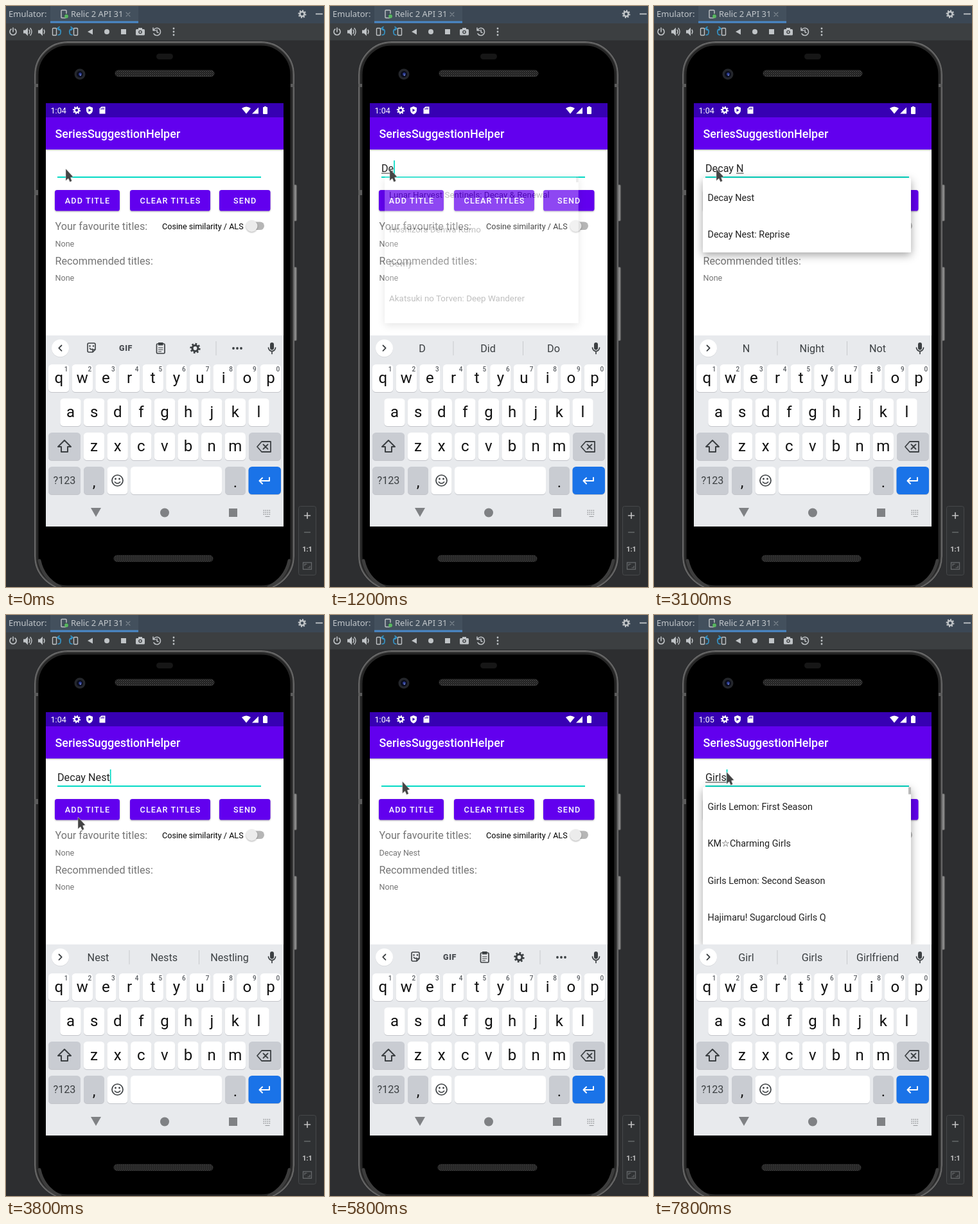
Write an HTML page that moves like this. It is 495 by 903 pixels and loops after 8 s.

```html
<!DOCTYPE html>
<html lang="en">
<head>
<meta charset="utf-8">
<title>Emulator demo</title>
<style>
html, body { margin: 0; width: 100%; height: 100%; overflow: hidden; background: #2d2e30; }
svg { display: block; width: 495px; height: 903px; font-family: Roboto, "Noto Sans", sans-serif; }
.ide { font: 13px "Noto Sans", "Open Sans", sans-serif; fill: #c3c8cc; }
.mid { text-anchor: middle; }
.btn { font-size: 12.6px; font-weight: 500; letter-spacing: 1.12px; fill: #fff; }
.head { font-size: 16.2px; fill: #757575; }
.small { font-size: 12.6px; fill: #757575; }
.row { font-size: 14.4px; fill: #212121; }
.key { font-size: 24px; fill: #111; }
.sup { font-size: 10px; fill: #5a5e63; font-weight: 500; }
.hint { font-size: 16.2px; fill: #3c4043; }
.raised { filter: drop-shadow(0 1.5px 1.2px rgba(0,0,0,.32)); }
.sheet { filter: drop-shadow(0 4px 7px rgba(0,0,0,.36)); }
.line { fill: none; stroke-linecap: round; stroke-linejoin: round; }
</style>
</head>
<body>
<svg id="stage" viewBox="0 0 495 903"></svg>
<script>
const LOOP = 8000, STEP = 100;
const INK = '#3c4043', PURPLE = '#6200ee', TEAL = '#03dac5';

const rect = (x, y, w, h, fill, r = 0, more = '') =>
  `<rect x="${x}" y="${y}" width="${w}" height="${h}" rx="${r}" fill="${fill}" ${more}/>`;
const disc = (x, y, r, fill, more = '') => `<circle cx="${x}" cy="${y}" r="${r}" fill="${fill}" ${more}/>`;
const text = (x, y, cls, s, more = '') => `<text x="${x}" y="${y}" class="${cls}" ${more}>${s.replace(/&/g, '&amp;')}</text>`;
const fill = (d, c) => `<path d="${d}" fill="${c}"/>`;
const line = (d, c, w = 1.6, more = '') => `<path class="line" d="${d}" stroke="${c}" stroke-width="${w}" ${more}/>`;
const move = (x, y, s) => `<g transform="translate(${x} ${y})">${s}</g>`;
const gear = (x, y, r, c) =>
  disc(x, y, r * .84, 'none', `stroke="${c}" stroke-width="${r * .36}" pathLength="16" stroke-dasharray="1 1"`) +
  disc(x, y, r * .56, 'none', `stroke="${c}" stroke-width="${r * .4}"`);

function ideBars() {
  const c = '#c0c4c7', blue = '#3592c4';
  const speaker = x => fill(`M${x} 37.5h3l4-4v13l-4-4h-3z`, c);
  const turn = (x, dir) => move(x, 40, `<g transform="scale(${dir} 1)">` +
    rect(-6.5, -5.5, 6, 11, 'none', 1, `stroke="${c}" stroke-width="1.4"`) +
    line('M2 -5q5 1 4 6q0 4 -4 4M4 -7.5l-3 2.5l3 2.5', blue, 1.7) + '</g>');
  return rect(0, 0, 495, 27, '#3b4754') + rect(69, 0, 137, 27, '#43505d') + rect(69, 23.5, 137, 3, '#4a88c7') +
    rect(0, 27, 495, 27, '#3c3f41') + rect(0, 53, 495, 1, '#323537') +
    text(4, 17, 'ide', 'Emulator:') + text(101, 17, 'ide', 'Relic 2 API 31') +
    rect(86, 6.5, 8, 12, 'none', 1, `stroke="${c}" stroke-width="1.4"`) + rect(90, 12, 7, 6, '#3b4754') +
    disc(94, 16, 3, '#57b65f') + line('M187 10l6 6m0-6l-6 6', '#7d8790', 1.1) +
    gear(461, 12.5, 6.3, c) + rect(482, 11.5, 11, 1.8, c) +
    line('M8 36a5 5 0 1 0 6 0M11 34v6', c) +
    speaker(27) + line('M36 37q2 3 0 6M38 34.5q4 5.5 0 11', c, 1.4) +
    speaker(50) + line('M59 37q2 3 0 6', c, 1.4) + turn(79, 1) + turn(105, -1) +
    fill('M127 40l8-4.5v9z', c) + disc(157, 40, 4, c) + rect(179, 36, 8, 8, c) +
    rect(202, 36, 14, 9.5, c, 1.5) + rect(206, 34, 6, 3, c) + disc(209, 40.5, 2.8, '#3c3f41') + disc(209, 40.5, 1.4, c) +
    line('M230 37a5.7 5.7 0 1 1 0 6M229 34v4h4M235 37v3.5l2 1', c, 1.5) +
    [35, 40, 45].map(y => disc(261, y, 1.4, c)).join('');
}

function phone() {
  const grille = (x, y) => rect(x, y, 154, 9.5, 'url(#mesh)', 4.7, 'stroke="#333" stroke-width="1"');
  const side = (y, h) => rect(447, y, 5.5, h, 'url(#metal)', 1.5, 'stroke="#666" stroke-width=".8"');
  // Nested outlines shade the metal rim from its lit outer edge to the glass.
  const rim = (inset, c, w = 1.5) => rect(44 + inset, 55 + inset, 405 - 2 * inset, 852 - 2 * inset, 'none', 52 - inset,
    `stroke="${c}" stroke-width="${w}"`);
  return side(278, 56) + side(406, 114) +
    rect(44, 55, 405, 852, '#000', 52) + rim(4.5, '#262626', 4) + rim(2, '#505050', 1.8) + rim(.8, '#707070') +
    line('M52 862Q58 890 84 903M441 862Q435 890 409 903', '#3d3d3d', 5) +
    rect(44, 121, 6, 5, '#5a5a5a') + rect(443, 121, 6, 5, '#5a5a5a') + rect(44, 286, 6, 8, '#5a5a5a') +
    rect(234, 74, 26, 9, '#161616', 4.5) + grille(170, 100) + grille(168, 854) +
    disc(115, 106, 8.5, '#24262b') + disc(115, 106, 5, '#0a0d1c') + disc(115.5, 106, 2.4, '#2d3d92') + disc(116, 107.5, 1, '#7f91d8');
}

function zoomPanel() {
  const c = '#c4c4c4', dim = '#66696b';
  return rect(455.5, 777.5, 27, 107, '#2f3133', 3, 'stroke="#46484a"') +
    line('M464.5 792h9M469 787.5v9', c) + line('M464.5 818h9', dim, 1.4) +
    text(469, 848, 'mid', '1:1', 'font-size="11" font-weight="700" fill="#c4c4c4"') +
    rect(462.5, 865, 13, 10.5, 'none', 0, `stroke="${dim}" stroke-width="1.3"`) +
    line('M465 870v-2.5h3M473 870.5v2.5h-3', dim, 1.2);
}

function appPage() {
  const button = (x, w, label) => rect(x, 286, w, 32.5, PURPLE, 3.6, 'class="raised"') +
    text(x + w / 2 + .5, 307, 'btn mid', label);
  return rect(62, 151, 370, 658, '#fff') +
    rect(62, 173, 370, 50, PURPLE, 0, 'class="raised"') + rect(62, 151, 370, 22, '#3700b3') +
    text(69.5, 167, '', '1:04', 'id="clock" font-size="12.6" fill="#fff"') +
    gear(110, 162, 6, '#fff') +
    fill('M130 156l5 2v4q0 4-5 6.5q-5-2.5-5-6.5v-4z', '#fff') + fill('M128.5 159.5l4 2.5l-4 2.5z', '#3700b3') +
    fill('M148.5 156.5h6v11h-9v-8z', '#fff') + fill('M147.5 159h1v2h-1zM149.5 158h1v3h-1zM151.5 158h1v3h-1z', '#3700b3') +
    fill('M367 159q7-5 14 0l-7 8.5z', '#fff') + fill('M383 167.5h10v-10z', '#fff') +
    rect(400, 157, 7, 11, '#fff', 1) + rect(402, 156, 3, 2, '#fff') +
    text(76.5, 205, '', 'SeriesSuggestionHelper', 'font-size="18" font-weight="500" fill="#fff"') +
    rect(80, 265, 317, 2, TEAL) +
    button(76, 101, 'ADD TITLE') + button(193, 125, 'CLEAR TITLES') + button(332, 79.5, 'SEND') +
    `<g clip-path="url(#addClip)"><circle id="ripple" cx="118" cy="306" r="50" fill="url(#glow)"/></g>` +
    text(76.5, 348, 'head', 'Your favourite titles:') + text(243, 346.5, 'small', 'Cosine similarity / ALS', 'style="fill:#000"') +
    rect(376, 335.5, 26, 12.6, '#b6b6b6', 6.3) + disc(382.5, 342, 9, '#ececec', 'class="raised"') +
    text(76.5, 373.5, 'small', 'None', 'id="favourites"') +
    text(76.5, 401.5, 'head', 'Recommended titles:') + text(76.5, 427, 'small', 'None') +
    `<g id="field"></g><g id="popup"></g>`;
}

function keyboard() {
  const grey = '#c9ccd2';
  const cap = (x, y, w, c = '#fff') => rect(x, y + 1, w, 43, '#c3c5ca', 5.5) + rect(x, y, w, 43, c, 5.5);
  const letters = (s, x, y, nums) => [...s].map((ch, i) => {
    const cx = x + i * 36.63;
    return cap(cx - 16.2, y, 32.4) + text(cx, y + 28.5, 'key mid letter', ch) +
      (nums ? text(cx + 11.5, y + 11, 'sup mid', String((i + 1) % 10)) : '');
  }).join('');
  return rect(62, 512, 370, 297, '#e8eaed') + disc(84.5, 532.5, 13.5, '#d2d4d8') + disc(84.5, 531.7, 13.5, '#fff') +
    `<path id="chevron" class="line" stroke="${INK}" stroke-width="1.8"/>` + `<g id="bar"></g>` +
    rect(411, 523, 6, 11.5, INK, 3) + line('M408.5 531a5.5 5.5 0 0 0 11 0M414 537v3.5', INK, 1.7) +
    letters('qwertyuiop', 82.2, 557, true) + letters('asdfghjkl', 100.5, 610) +
    cap(66, 663, 50, grey) + letters('zxcvbnm', 137, 663) + cap(378, 663, 50, grey) +
    `<path id="shift" class="line" d="M91 675l10 10h-5v8h-10v-8h-5z" stroke="${INK}" stroke-width="2"/>` +
    line('M398 677h14v16h-14l-7-8zM400.5 681.5l7 7m0-7l-7 7', INK, 1.8) +
    cap(66, 716, 50, grey) + cap(121, 716, 32, grey) + cap(157.5, 716, 32) + cap(194, 716, 142) +
    cap(341, 716, 32, grey) + cap(377.5, 716, 50.5, '#1a73e8') +
    text(91, 743, 'hint mid', '?123') + text(137, 748, 'key mid', ',') + text(357, 748, 'key mid', '.') +
    disc(173.5, 737.5, 8.5, 'none', `stroke="${INK}" stroke-width="1.7"`) + disc(170.5, 735, 1.4, INK) + disc(176.5, 735, 1.4, INK) +
    line('M169.3 739.8q4.2 4.6 8.4 0', INK, 1.5) +
    line('M410 733v5h-15M399 733.5l-4.5 4.5l4.5 4.5', '#fff', 2) +
    fill('M132 780h16l-8 14z', '#7f8184') + disc(247, 787.5, 7, '#7f8184') + rect(347, 781, 13, 13, '#7f8184') +
    [784, 787, 790].map(y => line(`M401 ${y}h12`, '#96989b', 1.4, 'stroke-dasharray=".6 2.4"')).join('') +
    line('M404 793.5h6', '#96989b', 1.2);
}

function toolbar() {
  return line('M139 534v-8q0-2-2-2h-8q-2 0-2 2v10q0 2 2 2h6zM139 534h-4v4M130.5 532q2 3 4 1', INK) +
    disc(130.5, 528.5, 1.2, INK) + disc(136, 528.5, 1.2, INK) +
    text(186.5, 536, 'mid', 'GIF', 'font-size="12.5" font-weight="900" fill="#4a4e53" letter-spacing=".6"') +
    rect(234.5, 525, 12.5, 15, 'none', 1.5, `stroke="${INK}" stroke-width="1.7"`) + rect(237, 523, 7.5, 4.5, INK) +
    line('M237.5 531h6.5M237.5 534h6.5M237.5 537h4', INK, 1.2) +
    gear(294.5, 532, 8, INK) + rect(326.5, 521, 1, 22, '#c8cacd') +
    [354, 360, 366].map(x => disc(x, 532, 1.9, INK)).join('');
}

const skull = (x, y, bones) => move(x, y,
  (bones ? line('M-7 1l14 7M7 1l-14 7M-7.5 -6l3 2M7.5 -6l-3 2', '#c3ccd1', 1.6) : '') +
  `<ellipse cy="-2" rx="${bones ? 5 : 6.5}" ry="6" fill="#f4f6f7"/>` + rect(-3, 2, 6, 5, '#f4f6f7', 1.5) +
  disc(-2.4, -1.5, 1.7, '#47565e') + disc(2.4, -1.5, 1.7, '#47565e') + fill('M0 1l1 2h-2z', '#47565e'));

function hints(words) {
  const split = x => rect(x, 521, 1, 22, '#c8cacd');
  return words.split(' ').map((w, i) => w === '*' ? split(348) + skull(324.5, 532, true) + skull(373, 532)
    : text([143.5, 246, 348][i], 538, 'hint mid', w)).join('') + split(191.5) + split(300);
}

// Each track is a list of [start time, value].
const typed = [[0, ''], [1000, 'D'], [1200, 'De'], [1600, 'Dec'], [1700, 'Deca'], [1900, 'Decay'], [2200, 'Decay '],
  [2700, 'Decay N'], [3500, 'Decay Nest'], [4900, ''], [6900, 'G'], [7200, 'Gi'], [7400, 'Gir'], [7600, 'Girl'], [7800, 'Girls']];
const composeFrom = [[0, 0], [2200, 6], [3500, 10], [4900, 0]];
const caretOn = [[0, 0], [600, 1], [2000, 0], [2700, 1], [3100, 0], [3500, 1], [3900, 0], [4500, 1],
  [5600, 0], [6100, 1], [6600, 0], [6900, 1]];
const bar = [[0, ''], [1000, 'D Did Do'], [1300, 'De Dear Deep'], [1600, 'Dec Decay *'], [2000, 'Decay Decays *'],
  [2200, 'is and *'], [2700, 'N Night Not'], [3500, 'Nest Nests Nestling'], [4900, ''], [6900, 'G Good Get'],
  [7200, 'Gi Give Girl'], [7400, 'Gir Girl Girls'], [7800, 'Girl Girls Girlfriend']];
const lists = [
  [0, { bar: 9, rows: ['Lunar Harvest Sentinels: Decay & Renewal', 'Hoshizora Denwa Kumo', 'Dewly', 'Akatsuki no Torven: Deep Wanderer'] }],
  [1700, { bar: 86, rows: ['Lunar Harvest Sentinels: Decay & Renewal', 'KR Volt III: Decay Squad', 'Decay Nest', 'Decay Nest: Reprise'] }],
  [2700, { bar: 0, rows: ['Decay Nest', 'Decay Nest: Reprise'] }],
  [7000, { bar: 8, rows: ['Girigiri Tanuki Parade', 'Pokari Girl Diary', 'Girl in the Paper Tower', 'Minato Girls Relay'] }],
  [7800, { bar: 11, rows: ['Girls Lemon: First Season', 'KM☆Charming Girls', 'Girls Lemon: Second Season', 'Hajimaru! Sugarcloud Girls Q'] }]];
const mousePath = [[0, 93, 253], [3000, 93, 253], [3100, 97, 253], [3400, 111, 291], [3600, 112, 298], [3900, 112, 322],
  [4000, 112, 322], [4100, 112, 309], [4200, 112, 303], [5500, 112, 303], [5900, 113, 244], [LOOP, 113, 244]];

const at = (track, t) => track.filter(k => k[0] <= t).pop()[1];
const ramp = (t, a, b) => Math.max(0, Math.min(1, (t - a) / (b - a)));

function mouseAt(t) {
  const i = mousePath.findIndex(k => k[0] > t), a = mousePath[i - 1], b = mousePath[i];
  const p = ramp(t, a[0], b[0]);
  return [a[1] + (b[1] - a[1]) * p, a[2] + (b[2] - a[2]) * p];
}

const pen = document.createElement('canvas').getContext('2d');
function width(s) {
  pen.font = '16.2px Roboto, "Noto Sans", sans-serif';
  return pen.measureText(s).width;
}

function fieldAt(t) {
  const s = at(typed, t), from = width(s.slice(0, at(composeFrom, t))), w = width(s);
  return text(80, 258, '', s, 'font-size="16.2" fill="#212121"') +
    (w > from ? rect(80 + from, 259.5, w - from, 1, '#333') : '') +
    (at(caretOn, t) ? rect(80 + w, 240, 1.7, 22, TEAL) : '');
}

function popupAt(t) {
  const grow = t < 5000 ? ramp(t, 1130, 1380) : ramp(t, 7130, 7380);
  const alpha = grow * (t < 5000 ? 1 - ramp(t, 3440, 3700) : 1);
  if (!alpha) return '';
  const { rows, bar: size } = at(lists, t), scale = .904 + .096 * grow;
  const height = rows.length > 2 ? 244.5 : 115.5;
  return `<g opacity="${alpha}" transform="translate(208 238) scale(${scale}) translate(-208 -238)">` +
    rect(76, 267.4, 324, height, '#fff', 1, 'class="sheet"') +
    rows.map((r, i) => text(83.5, 302.5 + i * 57.6, 'row', r)).join('') +
    (size ? rect(396, 267.6, 4, size, '#b9b9b9') : '') + '</g>';
}

const $ = id => document.getElementById(id);
$('stage').innerHTML = `<defs>
  <linearGradient id="metal"><stop stop-color="#444"/><stop offset=".6" stop-color="#999"/><stop offset="1" stop-color="#555"/></linearGradient>
  <pattern id="mesh" width="3" height="3" patternUnits="userSpaceOnUse"><rect width="3" height="3" fill="#101010"/>
    <path d="M0 3L3 0M0 0L3 3" stroke="#4a4a4a" stroke-width=".8"/></pattern>
  <radialGradient id="glow"><stop stop-color="#fff" stop-opacity=".27"/><stop offset=".65" stop-color="#fff" stop-opacity=".2"/>
    <stop offset="1" stop-color="#fff" stop-opacity="0"/></radialGradient>
  <clipPath id="addClip"><rect x="76" y="286" width="101" height="32.5" rx="3.6"/></clipPath></defs>` +
  rect(0, 0, 495, 903, '#2d2e30') + phone() + ideBars() + appPage() + keyboard() + zoomPanel() +
  `<path id="mouse" d="M0 0V18.5L4 15L6.5 20.5L9.5 19L7.5 13.5L11.5 12.5Z" fill="#444" stroke="#d8d8d8" stroke-opacity=".6" stroke-width=".8"/>`;
const letterKeys = [...document.querySelectorAll('.letter')].map(el => [el, el.textContent]);

let shown = -1;
function draw(now) {
  const t = Math.floor(now % LOOP / STEP) * STEP;
  if (t !== shown) {
    shown = t;
    const words = at(bar, t), caps = t === 900;
    $('field').innerHTML = fieldAt(t);
    $('popup').innerHTML = popupAt(t);
    $('bar').innerHTML = words ? hints(words) : toolbar();
    $('chevron').setAttribute('d', words ? 'M82.5 527.5l4.2 4.2l-4.2 4.2' : 'M86.5 527.5l-4.2 4.2l4.2 4.2');
    $('shift').style.fill = caps ? INK : 'none';
    letterKeys.forEach(([el, ch]) => { el.textContent = caps ? ch.toUpperCase() : ch; });
    $('clock').textContent = t < 7100 ? '1:04' : '1:05';
    $('favourites').textContent = t < 4900 ? 'None' : 'Decay Nest';
    $('ripple').setAttribute('r', 12 + 44 * ramp(t, 4600, 5000));
    $('ripple').style.opacity = ramp(t, 4600, 4800) * (1 - ramp(t, 5100, 5600));
    $('mouse').setAttribute('transform', `translate(${mouseAt(t)})`);
  }
  requestAnimationFrame(tick);
}
const start = performance.now();
const tick = () => draw(performance.now() - start);
requestAnimationFrame(tick);
</script>
</body>
</html>
```
